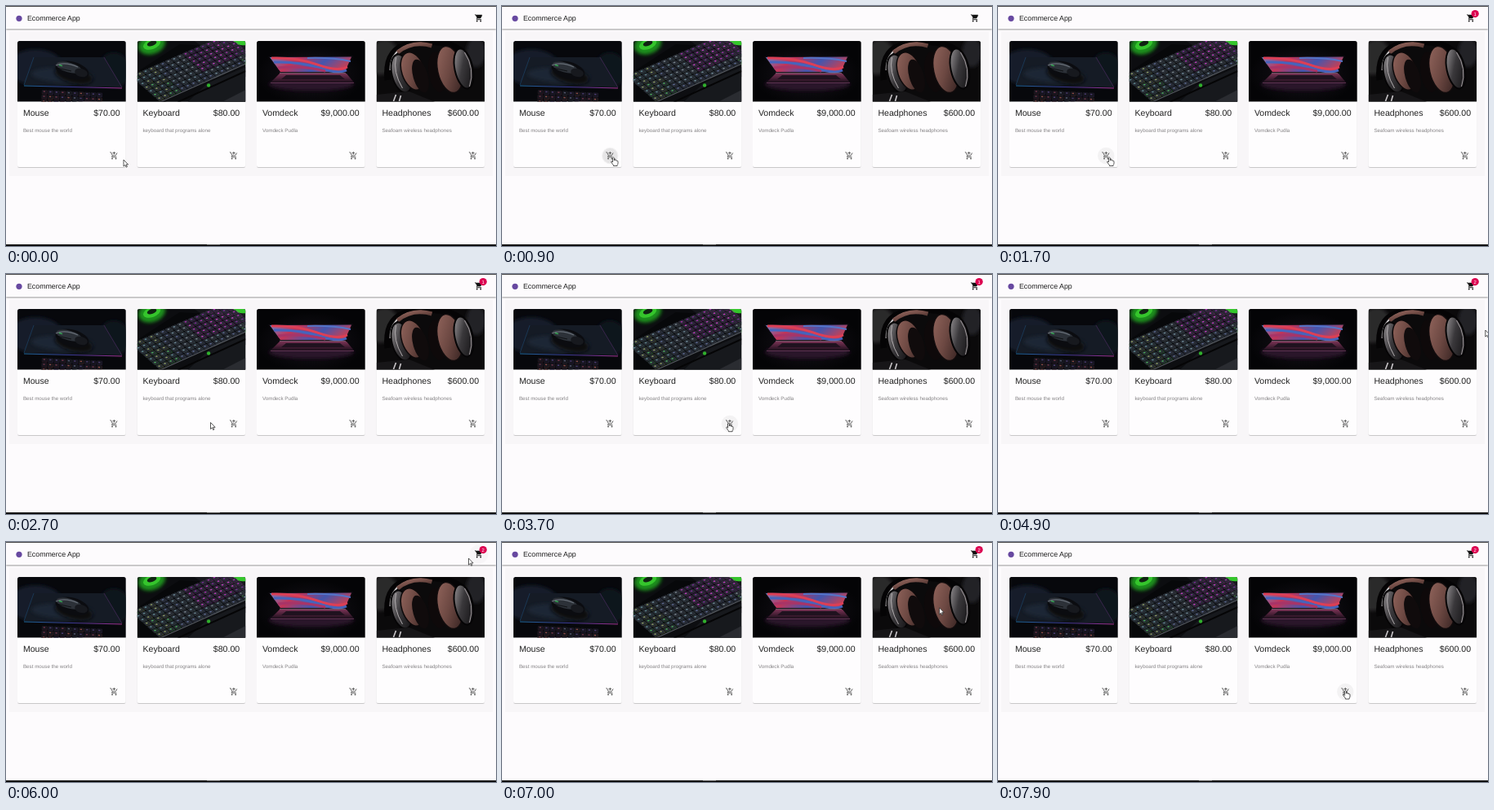
An HTML page that plays this animation: 600 by 295 pixels, repeating every 8000 ms.

```html
<!DOCTYPE html>
<html lang="en">
<head>
<meta charset="utf-8">
<title>Ecommerce App</title>
<style>
  html, body { margin: 0; width: 100%; height: 100%; overflow: hidden; background: #fdfbfd; }
  svg { display: block; width: 600px; height: 295px; }
  text { font-family: "Liberation Sans", Arial, sans-serif; text-rendering: geometricPrecision; }
</style>
</head>
<body>
<svg id="stage" viewBox="0 0 600 295" xmlns="http://www.w3.org/2000/svg">
  <defs>
    <clipPath id="photo"><path d="M0 74.6V2.5Q0 0 2.5 0H130.2Q132.7 0 132.7 2.5V74.6Z"/></clipPath>
    <filter id="drop" x="-10%" y="-10%" width="120%" height="125%">
      <feDropShadow dx="0" dy="0.7" stdDeviation="0.6" flood-opacity="0.27"/>
    </filter>
    <filter id="barDrop" x="-2%" y="-20%" width="104%" height="160%">
      <feDropShadow dx="0" dy="0.9" stdDeviation="1.2" flood-opacity="0.42"/>
    </filter>
    <filter id="soft" x="-40%" y="-40%" width="180%" height="180%"><feGaussianBlur stdDeviation="2"/></filter>
    <linearGradient id="rgb"><stop stop-color="#1d6a9c"/><stop offset=".5" stop-color="#3c3a98"/><stop offset="1" stop-color="#a5308e"/></linearGradient>
    <linearGradient id="wave" x2="1" y2=".25">
      <stop stop-color="#6a83c8"/><stop offset=".35" stop-color="#c03458"/>
      <stop offset=".7" stop-color="#4356ae"/><stop offset="1" stop-color="#b8425e"/>
    </linearGradient>
    <linearGradient id="base" x2="0" y2="1"><stop stop-color="#7a3355"/><stop offset="1" stop-color="#1c0f1b"/></linearGradient>
    <radialGradient id="night" cy=".55"><stop stop-color="#17131b"/><stop offset="1" stop-color="#040406"/></radialGradient>
    <linearGradient id="leather" x2="1" y2="1"><stop stop-color="#96685f"/><stop offset=".5" stop-color="#6c4842"/><stop offset="1" stop-color="#2e1d1c"/></linearGradient>
    <linearGradient id="metal" x2="1" y2="1"><stop stop-color="#a8a4a6"/><stop offset=".45" stop-color="#3a383b"/><stop offset="1" stop-color="#0d0c0e"/></linearGradient>
    <g id="rolls"><circle cx="7" cy="20" r="2"/><circle cx="17" cy="20" r="2"/></g>
    <g id="frame" fill="none" stroke-width="2">
      <path d="M1 3H3.6L7.8 12H16.2L20.4 4.5"/><path d="M7.6 12L6.1 14.7Q5.6 16 7 16H19"/>
    </g>
  </defs>
  <rect width="600" height="295" fill="#fdfbfd"/>
  <rect x="4" y="32" width="592" height="177" fill="#f8f6f8"/>
  <rect width="600" height="28" fill="#fdfbfd" filter="url(#barDrop)"/>
  <rect width="600" height="1" fill="#4a4a4a"/>
  <rect y="293" width="600" height="2" fill="#080808"/>
  <rect x="246" y="293" width="16" height="1" fill="#555"/>
  <circle cx="16" cy="15.3" r="3.6" fill="#6748a0"/>
  <text x="25.9" y="17.8" font-size="8.85" fill="#1c1c1c">Ecommerce App</text>
  <g id="cards"></g>
  <g id="hovers"></g>
  <g id="icons"></g>
  <g id="badge">
    <circle r="4.6" fill="#dc0050"/>
    <text id="count" y="2.1" font-size="6" fill="#fff" text-anchor="middle"></text>
  </g>
  <g id="cursor" stroke-linejoin="round">
    <path id="arrow" d="M0 0V8.1L1.9 6.4L3.2 9.2L4.4 8.6L3.1 5.9H5.6Z" fill="#fff" stroke="#222" stroke-width=".75"/>
    <path id="hand" d="M-.9 5V.8Q0-.6.9.8V3.8Q2-.1 2.6 4Q3.8 3 4.1 4.4Q5.5 3.7 5.5 5.3V7.3Q5.4 8.8 4.6 9.4V10.5H-.1V9.5L-2.6 6.2Q-3.1 4.6-1.8 5.1L-.9 6Z" fill="#fff" stroke="#222" stroke-width=".75"/>
  </g>
</svg>
<script>
const LOOP = 8000, STEP = 100;
const $ = id => document.getElementById(id);

let seed = 11;
const rnd = () => (seed = seed * 16807 % 2147483647) / 2147483647;
const pick = list => list[Math.floor(rnd() * list.length)];
const poly = (pts, fill, extra = '') => `<polygon points="${pts}" fill="${fill}" ${extra}/>`;
const oval = (x, y, rx, ry, turn, fill, extra = '') =>
  `<ellipse rx="${rx}" ry="${ry}" transform="translate(${x} ${y}) rotate(${turn})" fill="${fill}" ${extra}/>`;
const line = (d, color, w, extra = '') =>
  `<path d="${d}" fill="none" stroke="${color}" stroke-width="${w}" ${extra}/>`;
const back = fill => `<rect width="133" height="75" fill="${fill}"/>`;
const soft = 'filter="url(#soft)"';

function keys(cols, rows, w, h, place, cap, glow) {
  let out = '';
  for (let r = 0; r < rows; r++) for (let c = 0; c < cols; c++) {
    const x = c * w, y = r * h, light = glow(c, r);
    out += `<rect x="${x}" y="${y}" width="${w * .9}" height="${h * .9}" rx="1" fill="${light}" opacity=".35"/>`
      + `<rect x="${x}" y="${y}" width="${w * .8}" height="${h * .76}" rx="1" fill="${cap}"/>`
      + `<rect x="${x + w * .25}" y="${y + h * .2}" width="${w * .3}" height="${h * .24}" fill="${light}"/>`;
  }
  return `<g transform="${place}">${out}</g>`;
}

const mousePhoto = () => back('#07080c')
  + oval(22, 32, 34, 22, 0, '#131c2a', soft)
  + oval(118, 36, 20, 22, 0, '#10161f', soft)
  + keys(10, 3, 7.5, 6, 'translate(30 60) rotate(3)', '#15151c', () => pick(['#6d3348', '#4a3a70', '#8a4a44', '#50566c']))
  + poly('20,20 106,20 128,57 8,54', '#151b25')
  + oval(55, 42, 38, 9, 3, '#1d2735', soft)
  + poly('8,54 128,57 127,60 9,57', '#0a0b10')
  + line('M20 20L8 54', '#1d4468', .7)
  + line('M8 55L128 58', 'url(#rgb)', 1.2)
  + line('M106 20L128 57', '#54306a', .6)
  + oval(69, 42, 24, 10, 14, '#090b0f', soft)
  + oval(67, 36, 21, 10.5, 15, '#0b0c10')
  + oval(63, 32.5, 16, 6, 15, '#2c3138')
  + line('M47 30Q58 25 74 32', '#666d76', 1.3)
  + line('M48 33L66 37', '#08090b', .8)
  + oval(78, 39, 8, 5, 15, '#17191e')
  + oval(53, 30, 2.4, .9, 15, '#37a455');

const rowGlow = (c, r) =>
  c > 8 && r < 5 ? pick(['#a92fae', '#c43bc0', '#7b2a96'])
  : c < 4 ? pick(['#4aa858', '#8a9a62', '#5f8a90'])
  : pick(['#6d8a96', '#5a6890', '#77838a']);

const keyboardPhoto = () => back('#0c0d10')
  + oval(18, 4, 17, 12, -20, '#1f8f1d', soft)
  + oval(18, 4, 11, 6, -20, '#35c52c')
  + oval(18, 3, 6, 3, -20, '#102412')
  + poly('70,0 133,0 133,28 96,18', '#17181c')
  + oval(127, 2, 9, 3, 10, '#35c52c')
  + oval(130, 27, 4, 4, 30, '#2fae28')
  + poly('0,38 52,4 118,8 133,30 133,44 34,75 0,75', '#07080a')
  + keys(17, 7, 7.6, 6.8, 'matrix(.92 -.4 .75 .66 -8 43)', '#272b33', rowGlow)
  + poly('28,75 133,27 133,75', '#0d0e11')
  + line('M28 75L133 28', '#54585f', 1.2)
  + poly('62,75 86,52 133,32 133,75', '#17191d')
  + line('M50 75L133 37', '#050506', 2)
  + poly('104,75 133,60 133,75', '#2a2c31')
  + '<circle cx="87.5" cy="54.5" r="2.2" fill="#30b02c"/>';

const laptopPhoto = () => back('url(#night)')
  + oval(67, 53, 52, 8, 0, '#2c162a', soft)
  + poly('28,40 110,40 119,51 17,51', 'url(#base)')
  + poly('36,42 102,42 108,47 30,47', '#20121f')
  + line('M17 51.5H119', '#6d3b5c', .8)
  + poly('14,19 118,18 109,40 28,40', '#0d0b11')
  + poly('16,20 116,19.5 108,38 29,38', 'url(#wave)')
  + line('M18 21Q50 20 74 29T111 32', '#dc3f56', 3)
  + line('M21 26Q52 25 76 33T110 36', '#4664bc', 3)
  + line('M26 33Q56 30 84 37', '#a83468', 3)
  + line('M62 21Q92 20 115 25', '#5474c8', 2)
  + line('M28 39.4H109', '#9a7288', .8);

const headphonePhoto = () => back('#0b0a0b')
  + oval(8, 20, 18, 22, 20, '#2b292c', soft)
  + oval(122, 14, 12, 18, 0, '#242225', soft)
  + line('M14 48Q10 8 44 3Q86 -4 106 14', '#050405', 8)
  + line('M17 36Q17 10 44 4', '#c4c0c2', 1.8)
  + line('M26 14Q44 -1 68 6', 'url(#leather)', 5)
  + oval(31, 40, 12, 24, -14, 'url(#metal)', 'stroke="#060506" stroke-width="2"')
  + oval(45, 37, 14, 24, -18, 'url(#leather)', 'stroke="#0d090a" stroke-width="1.5"')
  + oval(54, 43, 9, 21, -16, '#100b0c')
  + line('M24 20Q20 38 32 58', '#b3aeb0', 1)
  + oval(75, 38, 11, 25, -8, '#0e090a')
  + oval(90, 35, 15, 29, -12, 'url(#leather)', 'stroke="#120c0d" stroke-width="1.5"')
  + oval(107, 34, 11, 25, -12, 'url(#metal)', 'stroke="#050405" stroke-width="2"')
  + line('M108 14Q121 34 114 56', '#a49da0', 1)
  + poly('0,66 40,62 72,75 0,75', '#171618')
  + line('M21 74L24 66M28 74L30 67', '#c8c5c8', 1.6);

const items = [
  [14, 'Mouse', '$70.00', 'Best mouse the world', mousePhoto],
  [160.6, 'Keyboard', '$80.00', 'keyboard that programs alone', keyboardPhoto],
  [307, 'Vomdeck', '$9,000.00', 'Vomdeck Pudla', laptopPhoto],
  [453.5, 'Headphones', '$600.00', 'Seafoam wireless headphones', headphonePhoto]
];

$('cards').innerHTML = items.map(([x, name, price, note, photo]) => `
  <g transform="translate(${x} 43)">
    <rect width="132.6" height="155" rx="2.5" fill="#fefdfe" filter="url(#drop)"/>
    <g clip-path="url(#photo)">${photo()}</g>
    <text x="6.9" y="92.1" font-size="10.6" fill="#222">${name}</text>
    <text x="125.6" y="92.1" font-size="10.6" fill="#222" text-anchor="end">${price}</text>
    <text x="6.9" y="111.8" font-size="6.25" fill="#858385">${note}</text>
  </g>`).join('');

// Buttons: one per card, then the header cart
const spots = items.map(([x]) => [x + 118.3, 184]).concat([[579, 15]]);

$('icons').innerHTML = spots.map(([x, y], i) => {
  const cart = i === 4;
  const color = cart ? '#111' : '#555';
  const part = cart ? '<path d="M4 3H21L16.5 12H8Z"/>' : '<path d="M11 1h2v3h3v2h-3v3h-2V6H8V4h3z"/>';
  return `<g transform="translate(${x - 5.4} ${y - 5.5}) scale(.45)" fill="${color}" stroke="none">
    <use href="#rolls"/>${part}<use href="#frame" stroke="${color}"/></g>`;
}).join('');

$('hovers').innerHTML = spots.map(([x, y], i) =>
  `<circle cx="${x}" cy="${y}" r="${i === 4 ? 11.5 : 10.3}"/><circle cx="${x}" cy="${y}"/>`).join('');
const rings = [...$('hovers').children];

// Pointer stops: time, x, y
const path = [
  [0, 144, 189], [500, 137, 186], [900, 136.5, 186], [1700, 136.5, 186],
  [2300, 225, 186], [2700, 250.5, 182.5], [3400, 277.5, 183.2], [4300, 277.5, 183.2],
  [4900, 596.8, 69], [5100, 592, 58], [5500, 579, 17], [5800, 578, 17],
  [6000, 566.5, 20], [6800, 556, 62], [7600, 425.5, 182.5], [8000, 425.5, 182.5]
];
const clicks = [[0, 780], [1, 3850]];
const adds = [1200, 4200];

const clamp = v => Math.max(0, Math.min(1, v));
const ease = v => v * v * (3 - 2 * v);

function pointer(t) {
  const i = Math.max(1, path.findIndex(p => p[0] > t));
  const [a, b] = [path[i - 1], path[i]];
  const k = ease(clamp((t - a[0]) / (b[0] - a[0])));
  return [a[1] + (b[1] - a[1]) * k, a[2] + (b[2] - a[2]) * k];
}
function over(t, [x, y]) {
  const [px, py] = pointer(Math.max(0, t));
  return Math.hypot(px - x, py - y) < 10.5;
}
function hover(t, spot) {
  let sum = 0;
  for (let d = 0; d < 150; d += 15) sum += over(t - d, spot);
  return sum / 10;
}

function draw(t) {
  const [x, y] = pointer(t);
  const hand = spots.some(s => over(t, s));
  $('cursor').setAttribute('transform', `translate(${x} ${y})`);
  $('hand').style.display = hand ? '' : 'none';
  $('arrow').style.display = hand ? 'none' : '';

  spots.forEach((s, i) => {
    rings[i * 2].setAttribute('fill-opacity', .045 * hover(t, s));
    const click = clicks.find(c => c[0] === i);
    const age = click ? t - click[1] : -1;
    const live = age >= 0 && age < 400;
    rings[i * 2 + 1].setAttribute('r', live ? 10.3 * ease(clamp(age / 150)) : 0);
    rings[i * 2 + 1].setAttribute('fill-opacity', live ? .05 * clamp((400 - age) / 250) : 0);
  });

  const count = adds.filter(a => t >= a).length;
  const pop = ease(clamp((t - adds[0] + 100) / 225));
  $('badge').setAttribute('transform', `translate(584.2 9.6) scale(${count ? pop : 0})`);
  $('count').textContent = count || '';
}

const start = performance.now();
function tick(now) {
  const t = Math.max(0, now - start) % LOOP;
  draw(Math.floor(t / STEP) * STEP);
  requestAnimationFrame(tick);
}
draw(0);
requestAnimationFrame(tick);
</script>
</body>
</html>
```
